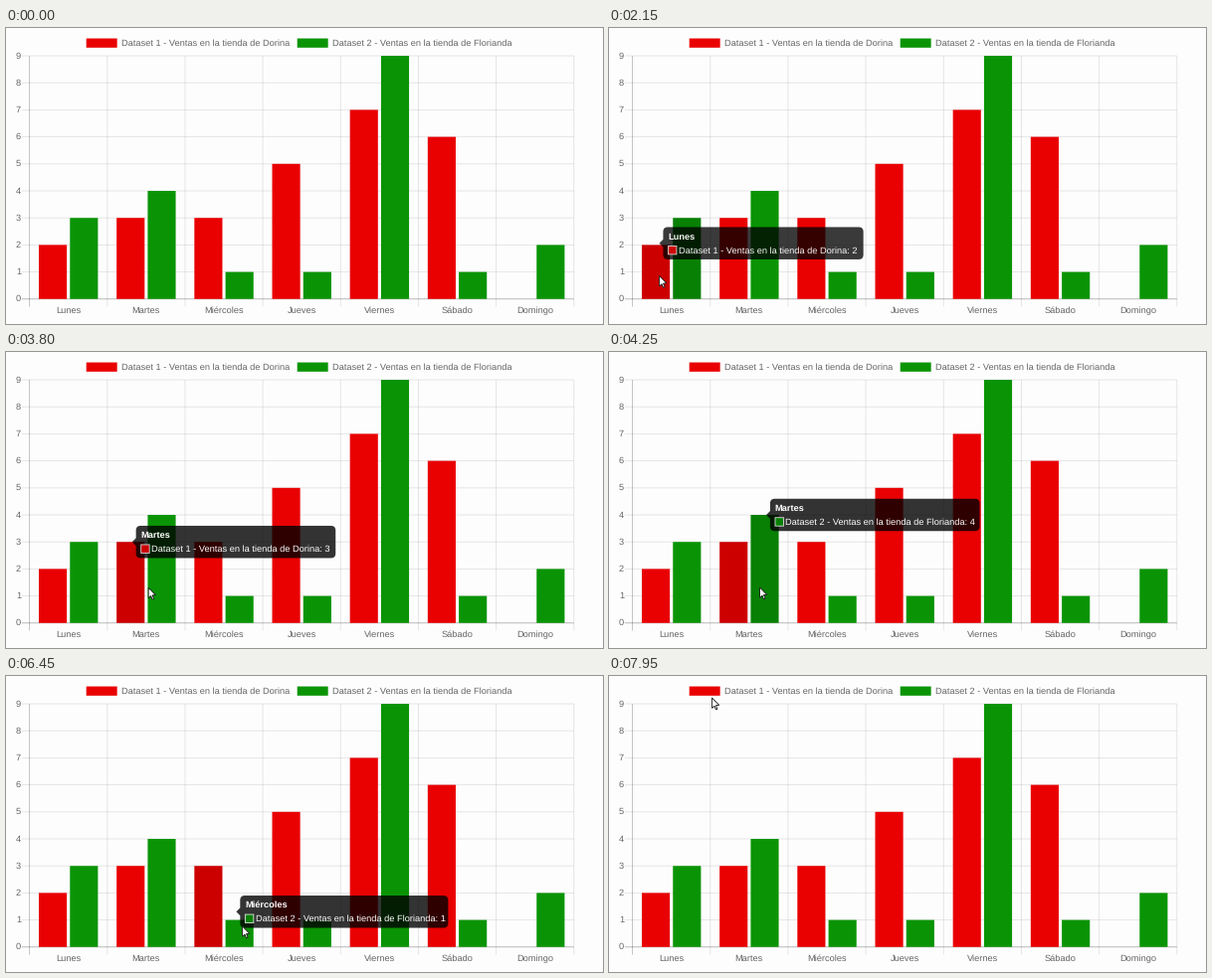
These frames come from a looping animation (600x298 px, 8000 ms). A matplotlib script:

```python
import matplotlib.pyplot as plt
from matplotlib.animation import FuncAnimation
from matplotlib.patches import PathPatch, Polygon, Rectangle
from matplotlib.path import Path
import numpy as np

W, H, DPI = 600, 298, 100
STEP, LOOP = 50, 8000
U = 0.774                      # chart unit in pixels
FONT = 9.25 * 72 / DPI
X0, X1, Y0, DY = 23.6, 570.8, 272.8, 27.2
CAT = (X1 - X0) / 7
BAR_W = CAT * 0.36
TIP_H = 42 * U
EASE_MS, LAG_MS, TINT_MS = 400, 100, 200

DAYS = ["Lunes", "Martes", "Miércoles", "Jueves", "Viernes", "Sábado", "Domingo"]
SALES = [[2, 3, 3, 5, 7, 6, 0], [3, 4, 1, 1, 9, 1, 2]]
NAMES = ["Dataset 1 - Ventas en la tienda de Dorina",
         "Dataset 2 - Ventas en la tienda de Florianda"]
FILL = ["#e90000", "#0a9405"]
DARK = ["#cd0000", "#088004"]
TIP_W = [200.6, 210.6]

# Pointer stops: time, x, y
STOPS = np.array([
    (1650, 85, 298), (2100, 50.5, 250.5), (2450, 51, 247), (3000, 88, 241),
    (3500, 126, 238), (4200, 151.5, 237), (5200, 152, 237),
    (5700, 170.3, 236.5), (6100, 212, 250), (6500, 238, 252),
    (6750, 232, 150), (7500, 80, 24), (7700, 103.5, 22)])

plt.rcParams["font.family"] = "Liberation Sans"
plt.rcParams["text.hinting"] = "none"
plt.rcParams["toolbar"] = "None"

fig = plt.figure(figsize=(W / DPI, H / DPI), dpi=DPI, facecolor="#fefdfe")
ax = fig.add_axes([0, 0, 1, 1])
ax.set(xlim=(0, W), ylim=(H, 0))
ax.axis("off")


def line(xs, ys, alpha):
    ax.plot(xs, ys, color="black", alpha=alpha, lw=0.9 * 72 / DPI,
            solid_capstyle="butt", snap=False, zorder=1)


def rect(x, y, w, h, color, z=2):
    patch = Rectangle((x, y), w, h, fc=color, ec="none", snap=False, zorder=z)
    return ax.add_patch(patch)


def label(x, cy, text, color="#666666", ha="left", z=3, **kw):
    return ax.text(x, cy + 2.6, text, color=color, ha=ha, va="baseline",
                   fontsize=FONT, zorder=z, **kw)


def bar_x(day, series):
    return X0 + CAT * (day + 0.3 + 0.4 * series)


def bar_top(day, series):
    return Y0 - DY * SALES[series][day]


# Grid, axis labels and legend
for v in range(10):
    y = Y0 - DY * v
    line([X0 - 10 * U, X1], [y, y], 0.1 if v else 0.3)
    label(X0 - 11 * U, y, str(v), ha="right")
for i in range(8):
    x = X0 + CAT * i
    line([x, x], [Y0 - 9 * DY, Y0 + 10 * U], 0.1 if i else 0.25)
for i, day in enumerate(DAYS):
    label(X0 + CAT * (i + 0.5), 284.6, day, ha="center")
for x, color, name in zip((80.7, 292.7), FILL, NAMES):
    rect(x, 10.5, 40 * U, 12 * U, color)
    label(x + 35.4, 15.2, name)

bars = {(d, s): rect(bar_x(d, s) - BAR_W / 2, bar_top(d, s), BAR_W,
                     Y0 - bar_top(d, s), FILL[s])
        for d in range(7) for s in range(2)}

# Tooltip and pointer
tip = ax.add_patch(PathPatch(Path([(0, 0), (1, 0)]), fc="black", ec="none",
                             snap=False, zorder=5))
key_edge = rect(0, 0, 12 * U, 12 * U, "#e4e4e4", 6)
key_fill = rect(0, 0, 9.8 * U, 9.8 * U, FILL[0], 7)
title = label(0, 0, "", "white", z=8, weight="bold")
body = label(0, 0, "", "white", z=8)
tip_parts = [tip, key_edge, key_fill, title, body]

ARROW = 0.63 * np.array([(0, 0), (0, 16.5), (3.8, 13), (6.3, 18.8),
                         (8.7, 17.8), (6.2, 12), (11.5, 11.7)])
pointer = ax.add_patch(Polygon(ARROW, fc="white", ec="#181818", snap=False,
                               lw=0.85 * 72 / DPI, zorder=9))


def ease_out(p, power):
    return 1 - (1 - np.clip(p, 0, 1)) ** power


def pointer_at(t):
    i = np.searchsorted(STOPS[:, 0], t, "right") - 1
    a, b = STOPS[np.clip([i, i + 1], [0, 1], len(STOPS) - [2, 1])] \
        if False else STOPS[np.clip(i, 0, len(STOPS) - 2):][:2]
    return a[1:] + (b - a)[1:] * ease_out((t - a[0]) / (b[0] - a[0]), 2)


def bar_under(pos):
    day, part = divmod((pos[0] - X0) / CAT, 1)
    bar = int(day), int(part > 0.5)
    inside = abs(part - 0.5) < 0.38 and bar_top(*bar) < pos[1] < Y0
    return bar if inside else None


def tip_goal(bar):
    """Left edge, middle height, width and opacity of a bar's tooltip."""
    return np.array([bar_x(*bar) + 7 * U, bar_top(*bar), TIP_W[bar[1]], 1])


def simulate():
    """Per frame: tooltip geometry, the bar it names, and the tinted bars."""
    states, active, shown, since = [], None, (0, 1), 0
    start = end = tip_goal(shown) * [1, 1, 1, 0]
    tinted = {}
    for t in range(0, LOOP, STEP):
        view = start + (end - start) * ease_out((t - since) / EASE_MS, 4)
        bar = bar_under(pointer_at(t - LAG_MS))
        if bar != active:
            active, start, since = bar, view, t
            if bar:
                shown, end = bar, tip_goal(bar)
                tinted = {b: w for b, w in tinted.items() if b[0] == bar[0]}
                tinted[bar] = t
            else:
                end, tinted = view * [1, 1, 1, 0], {}
        dark = {b for b, w in tinted.items() if t - w >= TINT_MS}
        states.append((view, shown, dark))
    return states


STATES = simulate()


def tip_path(x, cy, w):
    r, c = 6 * U, 5 * U
    a, b, x2 = cy - TIP_H / 2, cy + TIP_H / 2, x + w
    M, L, Q = Path.MOVETO, Path.LINETO, Path.CURVE3
    pts = [(M, x + r, a), (L, x2 - r, a), (Q, x2, a), (Q, x2, a + r),
           (L, x2, b - r), (Q, x2, b), (Q, x2 - r, b),
           (L, x + r, b), (Q, x, b), (Q, x, b - r),
           (L, x, cy + c), (L, x - c, cy), (L, x, cy - c),
           (L, x, a + r), (Q, x, a), (Q, x + r, a), (Path.CLOSEPOLY, x + r, a)]
    return Path([p[1:] for p in pts], [p[0] for p in pts])


def update(frame):
    t = frame * STEP
    (x, cy, w, alpha), (d, s), dark = STATES[frame]

    for bar, patch in bars.items():
        patch.set_facecolor((DARK if bar in dark else FILL)[bar[1]])

    top, left = cy - TIP_H / 2, x + 6 * U
    tip.set_path(tip_path(x, cy, w))
    key_edge.set_xy((left, top + 24 * U))
    key_fill.set_xy((left + 1.1 * U, top + 25.1 * U))
    key_fill.set_facecolor(DARK[s])
    title.set_text(DAYS[d])
    title.set_position((left, top + 12 * U + 2.8))
    body.set_text(f"{NAMES[s]}: {SALES[s][d]}")
    body.set_position((left + 14 * U, top + 30 * U + 2.8))
    for part in tip_parts:
        part.set_visible(alpha > 0.01)
        part.set_alpha(alpha * (0.8 if part is tip else 1))

    pointer.set_xy(ARROW + pointer_at(t))
    pointer.set_visible(t >= STOPS[0, 0])
    return [*bars.values(), *tip_parts, pointer]


anim = FuncAnimation(fig, update, frames=LOOP // STEP, interval=STEP,
                     init_func=lambda: update(0), repeat=True, repeat_delay=0)
plt.show()
```
